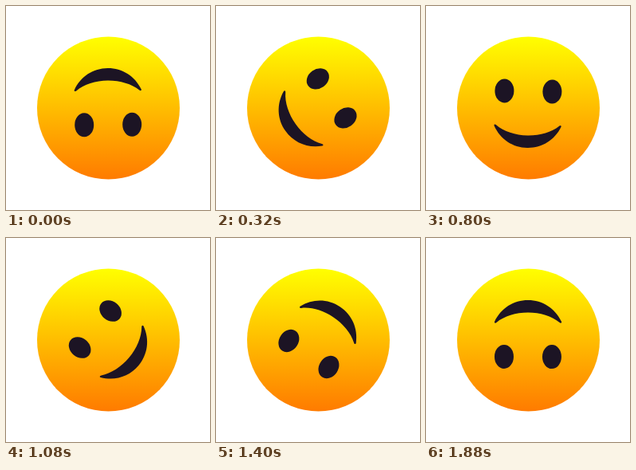
Recreate the animation shown at these times as an HTML page. Size 256 by 256 pixels, loop 1920 ms.

```html
<!DOCTYPE html>
<html lang="en">
<head>
<meta charset="utf-8">
<title>Rolling smile</title>
<style>
  html, body { margin: 0; width: 100%; height: 100%; overflow: hidden; background: #fff; }
  svg { display: block; width: 100%; height: 100%; }
</style>
</head>
<body>
<svg viewBox="0 0 256 256">
  <defs>
    <linearGradient id="skin" x1="0" y1="0" x2="0" y2="1">
      <stop offset="0" stop-color="#ffff00"/>
      <stop offset="1" stop-color="#ff7b00"/>
    </linearGradient>
  </defs>
  <circle cx="128.5" cy="128" r="89.5" fill="url(#skin)"/>
  <g id="features" fill="#1c1424">
    <ellipse cx="-30" cy="-21" rx="12" ry="15"/>
    <ellipse cx="30" cy="-21" rx="12" ry="15"/>
    <path d="M-42 23 C-34 40 -18 50 0 50 S34 40 42 23
             C42.6 21.4 41 20.6 39.5 22 C30 30 15 34.5 0 34.5
             S-30 30 -39.5 22 C-41 20.6 -42.6 21.4 -42 23 Z"/>
  </g>
</svg>
<script>
  const LOOP = 1920;
  const TURN = 980; // each half turn eases out over this time
  const features = document.getElementById('features');

  const easeOut = x => 1 - (1 - Math.min(Math.max(x, 0), 1)) ** 3;

  function render(time) {
    const t = time % LOOP;
    const angle = 180 - 180 * (easeOut(t / TURN) + easeOut((t - TURN) / TURN));
    features.setAttribute('transform', `translate(128 128) rotate(${angle.toFixed(3)})`);
  }

  const start = performance.now();
  function tick() {
    render(performance.now() - start);
    requestAnimationFrame(tick);
  }
  tick();
</script>
</body>
</html>
```
